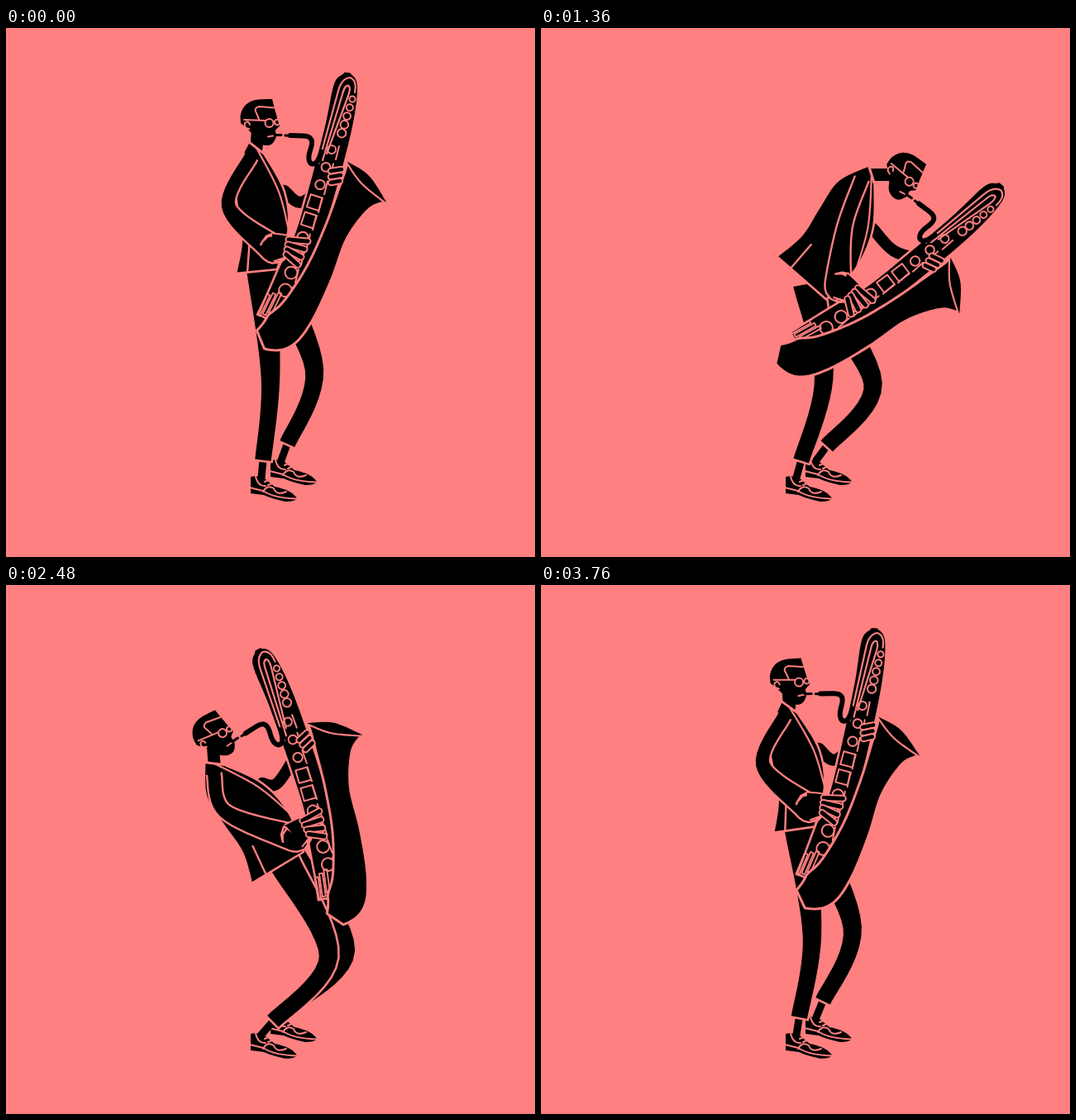
Animation of 640x640 px, one loop 3.84 s. Source, as an HTML page with a canvas:

```html
<!DOCTYPE html>
<html lang="en">
<head>
<meta charset="utf-8">
<title>Saxophone player</title>
<style>
html, body { margin: 0; width: 100%; height: 100%; overflow: hidden; background: #ff8080; }
canvas { display: block; }
</style>
</head>
<body>
<canvas id="stage" width="640" height="640"></canvas>
<script>
const INK = '#000', BG = '#ff8080';
const LOOP = 3840, STEP = 80;
const ctx = document.getElementById('stage').getContext('2d');
ctx.lineJoin = ctx.lineCap = 'round';

// Joints: horn, neck, tail, hem, elbow, near knee, far knee (x y each), then horn and head angle
const upright = [370, 240, 303, 145, 278, 297, 328, 292, 269, 215, 320, 425, 373, 413, 0, 0];
const ready = [373, 249, 307, 146, 267, 292, 327, 294, 278, 215, 303, 430, 369, 410, 8.7, 8];
const bow = [415, 327, 409, 183, 284, 270, 341, 330, 373, 245, 338, 422, 401, 430, 40, 45];
const rise = [418, 280, 364, 156, 290, 301, 362, 322, 345, 222, 359, 432, 404, 432, 14.4, 8];
const lean = [373, 256, 252, 216, 297, 361, 360, 323, 265, 274, 390, 450, 411, 442, -34, -25];
const farLean = [354, 243, 230, 222, 297, 353, 350, 308, 246, 272, 382, 444, 398, 438, -40.5, -28];

const mix = (a, b, k) => a.map((v, i) => v + (b[i] - v) * k);
const sway = (p, dx) => p.map((v, i) => i < 14 && i % 2 === 0 ? v + dx : v);

const KEYS = [
  [0, upright],
  [320, sway(mix(upright, ready, .5), -25)],
  [560, ready],
  [960, bow],
  [1120, mix(rise, bow, 1.08)],
  [1840, rise],
  [2080, mix(rise, bow, .7)],
  [2480, lean],
  [3120, farLean],
  [LOOP, upright]
];

// Tangents that never overshoot a key
const last = KEYS.length - 1;
const slope = (n, i) => (KEYS[n + 1][1][i] - KEYS[n][1][i]) / (KEYS[n + 1][0] - KEYS[n][0]);
const tangents = KEYS.map((key, n) => key[1].map((_, i) => {
  const into = slope((n + last - 1) % last, i), out = slope(n % last, i);
  return into * out > 0 ? 2 * into * out / (into + out) : 0;
}));

function poseAt(t) {
  let n = 0;
  while (t >= KEYS[n + 1][0]) n++;
  const [t0, a] = KEYS[n], [t1, b] = KEYS[n + 1];
  const d = t1 - t0, u = (t - t0) / d, v = 1 - u;
  return a.map((p, i) =>
    v * v * (1 + 2 * u) * p + u * u * (3 - 2 * u) * b[i] +
    u * v * d * (v * tangents[n][i] - u * tangents[n + 1][i]));
}

// Points and directions
const rad = a => a * Math.PI / 180;
const add = (p, d, k = 1) => [p[0] + d[0] * k, p[1] + d[1] * k];
const sub = (a, b) => add(a, b, -1);
const unit = d => add([0, 0], d, 1 / Math.hypot(...d));
const turn = ([x, y], a) => {
  const c = Math.cos(rad(a)), s = Math.sin(rad(a));
  return [x * c - y * s, x * s + y * c];
};
const normal = (a, b) => turn(unit(sub(b, a)), -90);
const toward = (a, b, dist) => add(a, unit(sub(b, a)), dist);

// Value of a smooth curve through a list, at index u
function along(list, u) {
  const n = list.length - 1, i = Math.min(Math.floor(u), n - 1), f = u - i;
  const b = list[i], c = list[i + 1], a = list[i - 1] ?? b, d = list[i + 2] ?? c;
  return b + f * (c - a + f * (2 * a - 5 * b + 4 * c - d + f * (3 * (b - c) + d - a))) / 2;
}
function trace(pts, per = 10) {
  const xs = pts.map(p => p[0]), ys = pts.map(p => p[1]);
  return Array.from({ length: (pts.length - 1) * per + 1 }, (_, k) => [along(xs, k / per), along(ys, k / per)]);
}
function outline(...sides) {
  const path = new Path2D();
  sides.flatMap(s => s.length > 2 ? trace(s) : s).forEach(p => path.lineTo(...p));
  return path;
}
// Strip of varying width around a smooth spine
function limb(pts, widths) {
  const spine = trace(pts), left = [], right = [];
  spine.forEach((p, k) => {
    const n = normal(spine[Math.max(k - 1, 0)], spine[Math.min(k + 1, spine.length - 1)]);
    const w = along(widths, k / 10) / 2;
    left.push(add(p, n, w));
    right.unshift(add(p, n, -w));
  });
  const path = new Path2D();
  [...left, ...right].forEach(p => path.lineTo(...p));
  return path;
}

function line(path, width = 2.4, color = BG) {
  ctx.lineWidth = width;
  ctx.strokeStyle = color;
  ctx.stroke(path);
}
function solid(path, width = 2.6) {
  ctx.fillStyle = INK;
  ctx.fill(path);
  line(path, width);
}
function stick(a, b, width) {
  const path = outline([a, b]);
  line(path, width + 4);
  line(path, width, INK);
}
function ring(x, y, r, width = 2) {
  const path = new Path2D();
  path.arc(x, y, r, 0, 7);
  line(path, width);
}
function within([x, y], angle, [px, py], paint) {
  ctx.save();
  ctx.translate(x, y);
  ctx.rotate(rad(angle));
  ctx.translate(-px, -py);
  paint();
  ctx.restore();
}

// Horn, drawn upright around its pivot
const HORN = [370, 240], HEAD = [305, 115], MOUTH = [325, 130];
const tube = limb([[413, 54], [411, 70], [400, 130], [368, 245], [345, 296], [316, 352]], [10, 31, 35, 34, 33, 24]);
const bell = limb([[437, 187], [421, 207], [399, 248], [378, 298], [352, 344], [330, 367], [308, 377]],
  [66, 44, 30, 34, 42, 46, 24]);
const rim = limb([[412, 161], [435, 183], [461, 212]], [2, 14, 2]);
const hooks = new Path2D('M378 164L402 76Q406 61 416 60Q425 63 422 78M383 160L407 80Q410 68 415 70Q417 74 414 82L388 152');
const crook = new Path2D('M344 130L360 130.5C371 131 372 137 368 148C364 160 368 165 372 164.5C377 164 378 158 382 150');
const mouthpiece = new Path2D('M325 129.5L333 129.5M338 130L362 131');

function drawKeys() {
  for (let i = 0; i < 5; i++) ring(419 - 3.2 * i, 86 + 10.3 * i, 3.6 + i * .4);
  for (let i = 0; i < 9; i++) {
    const x = 394 - 7 * i, y = 147 + 21.3 * i;
    if (i === 3 || i === 4) {
      within([x, y], 18, [0, 0], () => line(new Path2D('M-7-8H8V8H-7Z'), 2));
    } else ring(x, y, 5 + i * .35);
    line(outline([[x + 9, y - 4], [x + 5, y + 12]]), 2);
  }
  for (let i = 0; i < 3; i++) {
    within([311 + 7 * i, 336 - i], 26, [0, 0], () => line(new Path2D('M-2-15H2V13H-2Z'), 1.8));
  }
}

function drawHorn() {
  solid(tube);
  line(hooks, 2.2);
  drawKeys();
  solid(bell, 3);
  solid(rim, 2.2);
  line(crook, 6, INK);
  line(mouthpiece, 3, INK);
  for (let i = 0; i < 3; i++) stick([393, 173 + 7 * i], [406 - i, 171 + 7 * i], 4.5);
}

function drawHand() {
  solid(limb([[323, 265], [340, 264], [350, 267]], [34, 26, 20]), 2);
  for (let i = 0; i < 4; i++) stick([342 - i, 256 + 6 * i], [365 - 4 * i, 258 + 9.5 * i], 5);
}

const skull = outline(
  [[284, 115], [284, 104], [290, 93], [302, 87], [322, 86]],
  [[324, 94], [329, 112], [331, 118], [326, 124], [327, 131], [322, 140], [314, 142], [305, 138], [297, 127], [284, 115]]);
const face = new Path2D('M324 96.5L306 95Q299 97 303 103L306 110M288 111L314 112M294 122Q287 121 289 115Q293 111 295 117M317 131.5L328 129.5');

function drawHead() {
  ctx.fillStyle = INK;
  ctx.fill(skull);
  line(face, 2);
  ring(318.5, 115, 5);
  ring(328, 114, 3.2);
}

const shoe = new Path2D('M296 543Q304 541 313 545L325 555Q346 559 352 569Q350 573 338 573Q320 569 312 565L296 563Z');
const seams = new Path2D('M295 556L311 560Q325 569 352 569.5M302 543Q305 555 314 554M311 561Q316 552 324 557Q327 566 339 561M313 549l7-3M317 553l7-3');

function leg(hip, knee, foot, dx, dy) {
  const ankle = toward(foot, knee, 20);
  line(outline([ankle, foot]), 9, INK);
  solid(limb([hip, knee, ankle], [40, 25, 22]));
  within([dx, dy], 0, [0, 0], () => {
    ctx.fillStyle = INK;
    ctx.fill(shoe);
    line(seams, 2);
  });
}

// Points beside the line a-b, at even steps, pushed out by the given amounts
const bulge = (a, b, ...out) => [a, ...out.map((d, i) =>
  add(add(a, sub(b, a), (i + 1) / (out.length + 1)), normal(a, b), d)), b];

function draw(t) {
  const p = poseAt(t), joint = i => [p[2 * i], p[2 * i + 1]];
  const [horn, neck, tail, hem, elbow, knee, farKnee] = [0, 1, 2, 3, 4, 5, 6].map(joint);
  const hornTurn = p[14], headTurn = p[15];
  const onHorn = q => add(horn, turn(sub(q, HORN), hornTurn));

  const down = unit(sub(mix(tail, hem, .5), neck)), front = turn(down, -90);
  const half = turn(front, 38).map(v => v * 12);
  const vent = mix(tail, hem, .28), hip = mix(tail, hem, .64);
  const spine = bulge(sub(neck, half), tail, -13, -6, 3);
  const chest = bulge(add(neck, half), hem, 19, 19);
  const head = sub(onHorn(MOUTH), turn(sub(MOUTH, HEAD), headTurn));
  const shoulder = add(add(neck, down, 11), front, -7);

  ctx.fillStyle = BG;
  ctx.fillRect(0, 0, 640, 640);

  leg(add(hip, front, 10), farKnee, [333, 523], 24, -20);
  leg(hip, knee, [309, 544], 0, 0);

  // The far arm sags more the closer the hand is
  const hand = onHorn([392, 180]), reach = Math.hypot(...sub(hand, chest[1]));
  const sag = .33 * Math.sqrt(Math.max(0, 85 ** 2 - reach ** 2));
  line(outline([chest[1], add(mix(chest[1], hand, .4), [0, sag]), hand]), 14, INK);

  line(outline([neck, mix(neck, head, .6)]), 15, INK);
  solid(outline(spine, [vent, hem], [...chest].reverse()));
  line(outline([vent, toward(vent, neck, 38)]));
  line(outline([neck, add(chest[1], front, -7), chest[2]]), 2.2);
  line(outline([spine[0], chest[0]]), 3);

  within(head, headTurn, HEAD, drawHead);
  within(horn, hornTurn, HORN, drawHorn);

  solid(limb([shoulder, elbow, onHorn([318, 263]), onHorn([326, 266])], [18, 19, 32, 36]), 2.4);
  within(horn, hornTurn, HORN, drawHand);
}

const start = performance.now();
let shown = -1;
function tick() {
  const t = Math.floor((performance.now() - start) % LOOP / STEP) * STEP;
  if (t !== shown) draw(shown = t);
  requestAnimationFrame(tick);
}
tick();
</script>
</body>
</html>
```
